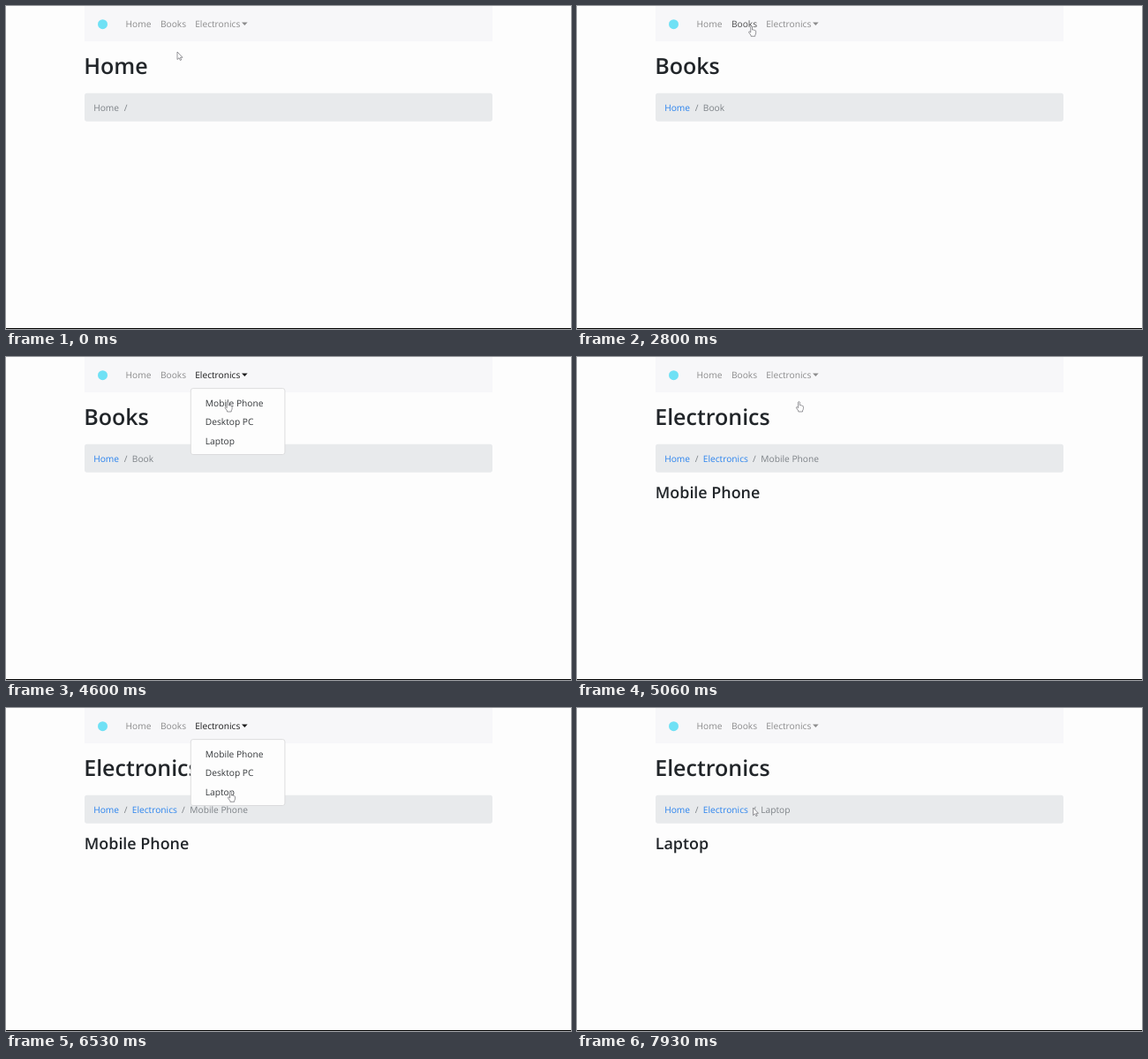
Recreate the animation shown at these times as an HTML page. Size 640 px wide and 366 px high, loop 8 s.

```html
<!DOCTYPE html>
<html lang="en">
<head>
<meta charset="utf-8">
<title>Breadcrumb demo</title>
<style>
  html, body { margin: 0; width: 100%; height: 100%; overflow: hidden; background: #fdfdfd; }
  svg { display: block; width: 100%; height: 100%; }
  text { font: 400 10.2px "Open Sans", "Noto Sans", sans-serif; text-rendering: geometricPrecision; white-space: pre; }
  .nav { fill: #8b8b8c; }
  .nav.hover { fill: #4d4d4e; }
  .nav.open { fill: #1a1a1b; }
  .title { font-size: 25px; font-weight: 600; fill: #212529; }
  .sub { font-size: 17.9px; font-weight: 600; fill: #212529; }
  .muted { fill: #7d8287; }
  .link { fill: #2a83ee; }
  .item { fill: #35383b; }
  .cursor { fill: #fdfdfd; stroke: #6a6b70; stroke-width: .7; stroke-linejoin: round; }
</style>
</head>
<body>
<svg viewBox="0 0 640 366">
  <rect width="640" height="366" fill="#fdfdfd"/>
  <rect x="89" width="462" height="40" fill="#f7f7f9"/>
  <circle cx="109.5" cy="20.7" r="5.5" fill="#6fe1f5"/>
  <text id="navHome" class="nav" x="135.5" y="24.2">Home</text>
  <text id="navBooks" class="nav" x="174.9" y="24.2">Books</text>
  <g id="navElec" class="nav">
    <text x="214.2" y="24.2">Electronics</text>
    <path d="M267 18.6h6.6l-3.3 3.4z"/>
  </g>
  <text id="title" class="title" x="88.2" y="76.8"></text>
  <rect x="89" y="98.8" width="462" height="32" rx="2.7" fill="#e8eaec"/>
  <g id="crumbs"></g>
  <text id="sub" class="sub" x="88.8" y="160.2"></text>
  <g id="menu">
    <rect x="209.3" y="35.6" width="106.6" height="74.9" rx="2.5" fill="#fdfdfd" stroke="#d6d6d7" stroke-width=".8"/>
    <text class="item" x="225.8" y="55.8">Mobile Phone</text>
    <text class="item" x="225.8" y="77.3">Desktop PC</text>
    <text class="item" x="225.8" y="98.8">Laptop</text>
  </g>
  <path id="arrow" class="cursor" d="M0 0v8.6l2-1.8 1.4 2.8 1.3-.6L3.4 6.3H6z"/>
  <path id="hand" class="cursor" d="M-.9.9Q0-.4.9.9V4.6Q2 3.9 2.6 4.9 3.6 4.3 4 5.3 5 5 5 6.2V8.4Q4.8 9.8 4.1 10.6V11.8H-.6V10.8L-2.9 7.6Q-3.2 6.2-2 6.5L-.9 7.5z"/>
  <rect y="365" width="640" height="1" fill="#000"/>
</svg>
<script>
const LOOP = 8000, STEP = 1000 / 15;
const $ = id => document.getElementById(id);

// pointer track: time, x, y
const track = [
  [0, 194, 52], [530, 193.5, 29], [1460, 193.5, 29], [1660, 195.5, 22.5],
  [2735, 195.5, 22.5], [3260, 246, 22], [3660, 248.4, 19.5], [3860, 248.4, 30],
  [4330, 251, 50.2], [5060, 251.4, 50.2], [5330, 252.2, 46], [5730, 254.5, 20],
  [5930, 254.5, 18.6], [6460, 254.5, 94.5], [7130, 254.5, 94.5], [7930, 199.5, 113]
];

// each page starts at its time
const pages = [
  { at: 0, title: "Home", sub: "", crumbs: ["Home", ""] },
  { at: 2060, title: "Books", sub: "", crumbs: ["Home", "Book"] },
  { at: 4730, title: "Electronics", sub: "Mobile Phone", crumbs: ["Home", "Electronics", "Mobile Phone"] },
  { at: 6660, title: "Electronics", sub: "Laptop", crumbs: ["Home", "Electronics", "Laptop"] }
];
const menuSpans = [[3460, 4730], [5730, 6660]];
const crumbX = [99.2, 142.8, 208.3], slashX = [133.8, 198.9];

const within = (v, a, b) => v >= a && v < b;
const smooth = p => p * p * (3 - 2 * p);

function pointer(t) {
  const i = track.findIndex(k => k[0] > t);
  if (i < 0) return track[track.length - 1].slice(1);
  const [t0, x0, y0] = track[i - 1], [t1, x1, y1] = track[i];
  const p = smooth((t - t0) / (t1 - t0));
  return [x0 + (x1 - x0) * p, y0 + (y1 - y0) * p];
}

function crumbMarkup(names) {
  const text = (x, cls, s) => `<text class="${cls}" x="${x}" y="119.2">${s}</text>`;
  const last = names.length - 1;
  return names.map((s, i) => {
    const cls = i < last && names[last] ? "link" : "muted";
    return text(crumbX[i], cls, s) + (i < last ? text(slashX[i], "muted", "/") : "");
  }).join("");
}

let shown;
function showPage(page) {
  if (page === shown) return;
  shown = page;
  $("title").textContent = page.title;
  $("sub").textContent = page.sub;
  $("crumbs").innerHTML = crumbMarkup(page.crumbs);
}

function render(time) {
  const t = Math.floor((time % LOOP + 6.7) / STEP) * STEP;
  const [x, y] = pointer(t);
  const open = menuSpans.some(([a, b]) => within(t, a, b));
  const onBar = within(y, 6, 34);
  const onBooks = onBar && within(x, 170, 209);
  const onElec = onBar && within(x, 209, 279);
  const onItem = open && y > 36;
  // the hand lingers after a choice until the pointer moves away
  const resting = within(t, 4730, 5200) || within(t, 6660, 7180);
  const hand = onBooks || onElec || onItem || resting;

  showPage(pages.filter(p => p.at <= t).pop());
  $("navBooks").setAttribute("class", onBooks ? "nav hover" : "nav");
  $("navElec").setAttribute("class", open ? "nav open" : onElec ? "nav hover" : "nav");
  $("menu").style.display = open ? "" : "none";
  $("arrow").style.display = hand ? "none" : "";
  $("hand").style.display = hand ? "" : "none";
  $(hand ? "hand" : "arrow").setAttribute("transform", `translate(${x} ${y})`);
}

const start = performance.now();
function tick() {
  render(performance.now() - start);
  requestAnimationFrame(tick);
}
tick();
</script>
</body>
</html>
```
